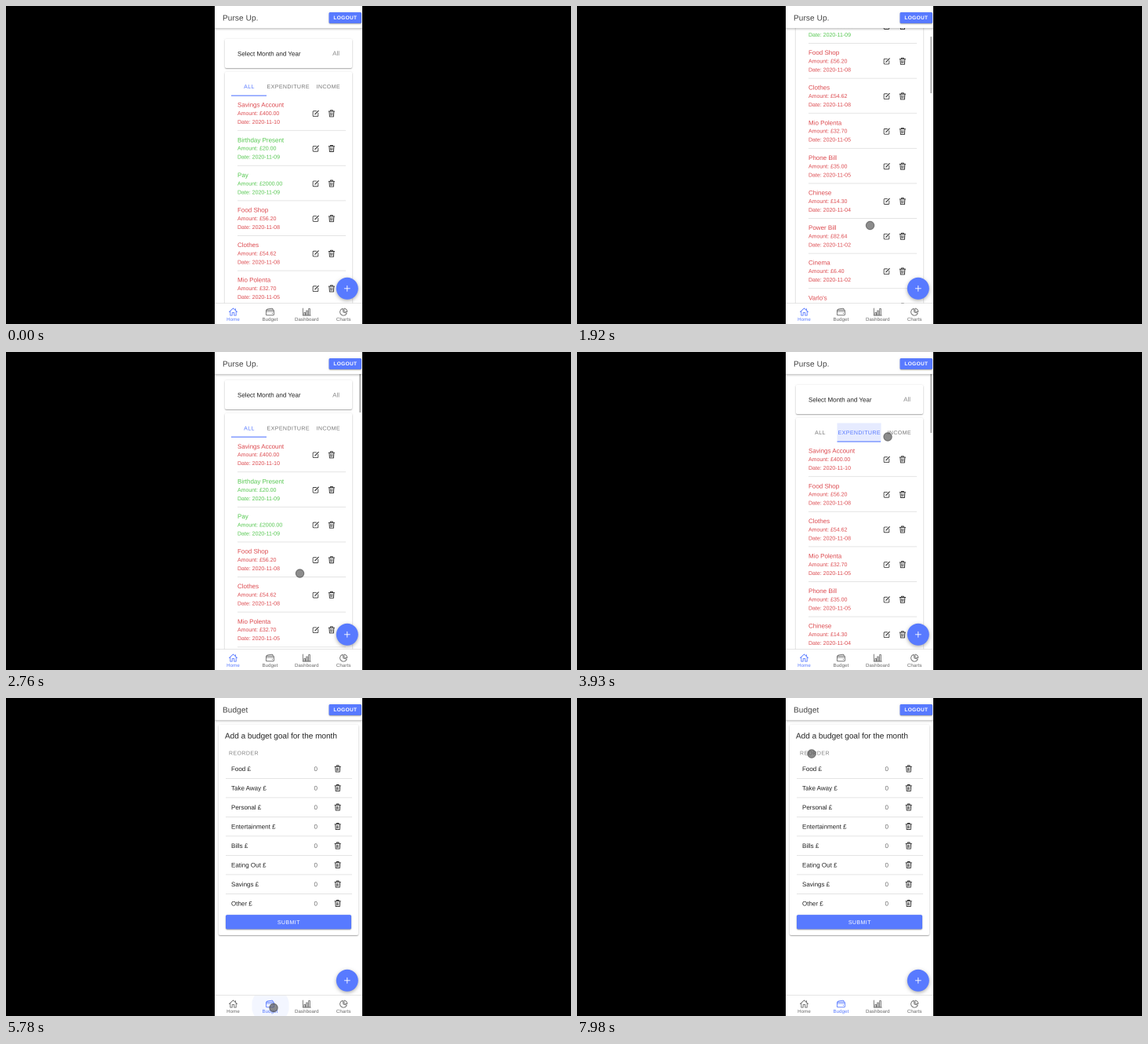
Write an HTML page with a canvas that moves like this. It is 720 px wide and 405 px high and loops after 8 s.

```html
<!DOCTYPE html>
<html lang="en">
<head>
<meta charset="utf-8">
<title>Budget app walkthrough</title>
<style>
html, body { margin: 0; width: 100%; height: 100%; overflow: hidden; background: #000; }
canvas { display: block; width: 720px; height: 405px; }
</style>
</head>
<body>
<canvas id="stage"></canvas>
<script>
const LOOP = 8000, W = 720, H = 405, LEFT = 266, RIGHT = 454;
const BLUE = '#587aff', RED = '#dd4b50', GREEN = '#55c850', DARK = '#2b2b2b', GREY = '#777', RULE = '#dedede';
const canvas = document.getElementById('stage');
const ctx = canvas.getContext('2d');
// Drawn at double size and scaled down, so small text keeps its true proportions.
const ratio = 2 * (window.devicePixelRatio || 1);
canvas.width = W * ratio;
canvas.height = H * ratio;

const TO_EXPENSES = 3450, TO_INCOME = 4200, TO_BUDGET = 5400, ROW = 44.6;

// name, amount, date, is income
const entries = [
  ['Savings Account', '400.00', '2020-11-10'],
  ['Birthday Present', '20.00', '2020-11-09', true],
  ['Pay', '2000.00', '2020-11-09', true],
  ['Food Shop', '56.20', '2020-11-08'],
  ['Clothes', '54.62', '2020-11-08'],
  ['Mio Polenta', '32.70', '2020-11-05'],
  ['Phone Bill', '35.00', '2020-11-05'],
  ['Chinese', '14.30', '2020-11-04'],
  ['Power Bill', '82.64', '2020-11-02'],
  ['Cinema', '6.40', '2020-11-02'],
  ["Varlo's", '18.50', '2020-11-01'],
  ['Pay', '2000.00', '2020-10-09', true],
  ['Refund', '24.00', '2020-10-02', true],
  ['Pay', '2000.00', '2020-09-09', true],
  ['Pay', '2000.00', '2020-08-09', true]
];
const goals = ['Food', 'Take Away', 'Personal', 'Entertainment', 'Bills', 'Eating Out', 'Savings', 'Other'];
const views = [
  { label: 'ALL', x: 287, w: 45, thumb: 72, rows: entries },
  { label: 'EXPENDITURE', x: 331.5, w: 55.5, thumb: 99, rows: entries.filter(e => !e[3]) },
  { label: 'INCOME', x: 387.5, w: 45.5, thumb: 208, rows: entries.filter(e => e[3]) }
];

const scrollKeys = [[550, 0], [1060, 113.7], [1460, 183], [1770, 183], [1920, 200.3],
  [2300, 228], [2470, 228], [2760, 6], [2860, 0]];
const pointerKeys = [[230, 460, 268], [560, 373, 279], [1500, 373, 279], [1920, 373.5, 279.5],
  [2760, 374.5, 282], [2900, 374, 280], [3400, 362, 105], [3640, 363, 105], [3930, 396, 108],
  [4120, 409, 104], [4300, 409, 104], [4930, 339, 398], [5080, 339, 396], [5250, 340, 394.5],
  [5780, 341, 394.5], [6560, 341, 394.5], [6950, 368, 394], [7180, 368, 394],
  [7440, 421, 250], [7640, 412, 95], [7840, 318, 63], [7980, 299, 71]];

const clamp = v => Math.max(0, Math.min(1, v));
const smooth = v => v * v * (3 - 2 * v);
const linear = v => v;

function track(keys, t, ease) {
  if (t <= keys[0][0]) return keys[0].slice(1);
  for (let i = 1; i < keys.length; i++) {
    const a = keys[i - 1], b = keys[i];
    if (t <= b[0]) {
      const k = ease((t - a[0]) / (b[0] - a[0]));
      return a.slice(1).map((v, j) => v + (b[j + 1] - v) * k);
    }
  }
  return keys[keys.length - 1].slice(1);
}

function rect(x, y, w, h, color) {
  ctx.fillStyle = color;
  ctx.fillRect(x, y, w, h);
}

function box(x, y, w, h, r, color) {
  ctx.beginPath();
  ctx.roundRect(x, y, w, h, r);
  ctx.fillStyle = color;
  ctx.fill();
}

function shadow(color, blur, dy) {
  ctx.shadowColor = color;
  ctx.shadowBlur = blur * ratio;
  ctx.shadowOffsetY = dy * ratio;
}

function raised(draw) {
  ctx.save();
  shadow('rgba(0,0,0,.16)', 2.5, .5);
  draw();
  shadow('rgba(0,0,0,.25)', 1, 1);
  draw();
  ctx.restore();
}

function text(str, x, y, size, color, { align = 'left', gap = 0, weight = 400 } = {}) {
  ctx.font = `${weight} ${size}px "Liberation Sans", Arial, sans-serif`;
  ctx.textRendering = 'geometricPrecision';
  ctx.letterSpacing = gap + 'px';
  ctx.textAlign = align;
  ctx.fillStyle = color;
  ctx.fillText(str, x, y);
}

function stroke(d, x, y, color, width = .9) {
  ctx.save();
  ctx.translate(x, y);
  ctx.strokeStyle = color;
  ctx.lineWidth = width;
  ctx.lineJoin = ctx.lineCap = 'round';
  ctx.stroke(new Path2D(d));
  ctx.restore();
}

function trash(x, y) {
  stroke('M-3.7-2.7H3.7M-1.4-2.7V-4H1.4V-2.7M-3-2.7L-2.5 4.1H2.5L3-2.7', x, y, DARK, .9);
  stroke('M-1.2-1L-1 2.5M0-1V2.5M1.2-1L1 2.5', x, y, DARK, .6);
}

function edit(x, y) {
  stroke('M.8-3.1H-2.4Q-3.6-3.1-3.6-2V2.6Q-3.6 3.7-2.4 3.7H2Q3.1 3.7 3.1 2.6V-.6', x, y, DARK, .8);
  stroke('M-.9 1L3.5-3.5', x, y, DARK, 1.1);
}

function header(title) {
  const fade = ctx.createLinearGradient(0, 28, 0, 31.5);
  fade.addColorStop(0, 'rgba(0,0,0,.21)');
  fade.addColorStop(1, 'rgba(0,0,0,0)');
  rect(LEFT, 28, RIGHT - LEFT, 3.5, fade);
  rect(LEFT, 0, RIGHT - LEFT, 28, '#fff');
  text(title, 276, 18.3, 10, '#424242', { gap: .125 });
  raised(() => box(411.5, 8, 41.5, 14, 2, BLUE));
  text('LOGOUT', 432.4, 17.2, 6.5, '#fff', { align: 'center', gap: .36, weight: 700 });
}

const navItems = [
  ['Home', 'M-5 0L0-4.7L5 0M-3.7-1V4.5H-1.3V1H1.3V4.5H3.7V-1M3-4V-2'],
  ['Budget', 'M-3.8-2.4H3.8Q5-2.4 5-1.2V3Q5 4.2 3.8 4.2H-3.8Q-5 4.2-5 3V-1.2Q-5-2.4-3.8-2.4M-4.6-2.2Q-4.4-3.3-3.2-3.6L2.4-4.4Q3.8-4.5 3.8-2.4M-5-.6H5M2.8 1.8H3.2'],
  ['Dashboard', 'M-5-4.5V4.5H5M-3.4 1H-1.8V4.3H-3.4ZM-.6-1.6H1V4.3H-.6ZM2.4-4H4V4.3H2.4Z'],
  ['Charts', 'M-1-4.2A4.4 4.4 0 1 0 4 1.6L-.3.4ZM.8-4.6A4.5 4.5 0 0 1 4.6 0L.8-.6Z']
];

function nav(active, t) {
  rect(LEFT, 379, RIGHT - LEFT, 26, '#fff');
  rect(LEFT, 378.3, RIGHT - LEFT, .7, '#dcdcdc');
  const age = t - TO_BUDGET;
  if (age > 0 && age < 560) {
    ctx.save();
    ctx.beginPath();
    ctx.rect(313.5, 379, 47, 26);
    ctx.clip();
    ctx.globalAlpha = .07 * clamp((560 - age) / 160);
    ctx.beginPath();
    ctx.arc(337, 392, 8 + 16 * clamp(age / 220), 0, 7);
    ctx.fillStyle = BLUE;
    ctx.fill();
    ctx.restore();
  }
  navItems.forEach(([label, icon], i) => {
    const x = 289.5 + i * 46.9, color = i === active ? BLUE : '#666';
    stroke(icon, x, 389.6, color, .85);
    text(label, x, 401.2, 6.1, color, { align: 'center', gap: .1 });
  });
}

function fab() {
  ctx.save();
  shadow('rgba(0,0,0,.33)', 5, 1.5);
  ctx.beginPath();
  ctx.arc(434.8, 359.8, 14, 0, 7);
  ctx.fillStyle = BLUE;
  ctx.fill();
  ctx.restore();
  stroke('M-3.5 0H3.5M0-3.5V3.5', 434.8, 359.8, '#fff', .9);
}

function card(x, y, w, h) {
  raised(() => box(x, y, w, h, 2, '#fff'));
}

function segment(active, since, from) {
  const view = views[active];
  if (active) {
    ctx.globalAlpha = .15 * clamp(since / 150);
    rect(view.x, 90.5, view.w + .5, 24, BLUE);
    ctx.globalAlpha = 1;
  }
  views.forEach((v, i) => text(v.label, v.x + v.w / 2 + .5, 105.2, 7,
    i === active ? BLUE : GREY, { align: 'center', gap: .42 }));
  const k = smooth(clamp(since / 260)), old = views[from];
  rect(old.x + (view.x - old.x) * k, 113.6, old.w + (view.w - old.w) * k, 1.1, BLUE);
}

function homePage(t) {
  const active = t < TO_EXPENSES ? 0 : t < TO_INCOME ? 1 : 2;
  const since = active ? t - (active === 1 ? TO_EXPENSES : TO_INCOME) : 1000;
  const [scroll] = track(scrollKeys, t, linear);
  const view = views[active];

  ctx.save();
  ctx.translate(0, -scroll);
  card(279, 42, 162, 37);
  text('Select Month and Year', 295, 63.4, 8, '#222');
  text('All', 425, 63.2, 8, '#8c8c8c', { align: 'right' });
  card(279, 84, 162, 1200);
  segment(active, since, Math.max(0, active - 1));
  view.rows.forEach(([name, amount, date, income], i) => {
    const y = i * ROW, color = income ? GREEN : RED;
    if (y - scroll > 290) return;
    text(name, 295, 128.7 + y, 8, color);
    text('Amount: £' + amount, 295, 139.1 + y, 7, color);
    text('Date: ' + date, 295, 150.1 + y, 7, color);
    edit(394.7, 136.9 + y);
    trash(414.9, 136.8 + y);
    rect(295, 158.3 + y, 138, .8, RULE);
  });
  ctx.restore();

  ctx.globalAlpha = clamp((t - 550) / 100);
  rect(450.5, 4 + scroll * .175, 1.4, view.thumb, '#9a9a9a');
  ctx.globalAlpha = 1;
  header('Purse Up.');
  fab();
  nav(0, t);
}

function budgetPage(t) {
  card(271, 34, 178, 268);
  text('Add a budget goal for the month', 279, 51.5, 10, '#222');
  text('REORDER', 284, 72.6, 7, '#858585', { gap: .42 });
  goals.forEach((goal, i) => {
    const y = i * 24.5;
    text(goal + ' £', 287, 93 + y, 8, '#222');
    text('0', 394.7, 92.8 + y, 8, '#6c6c6c', { align: 'center' });
    trash(422.7, 90 + y);
    if (i < goals.length - 1) rect(280, 102 + y, 161, .8, RULE);
  });
  raised(() => box(280, 276.3, 160, 18, 2, BLUE));
  text('SUBMIT', 360.3, 287.9, 7, '#fff', { align: 'center', gap: .42 });
  header('Budget');
  fab();
  nav(1, t);
}

function pointer(t) {
  if (t < 230) return;
  const [x, y] = track(pointerKeys, t, smooth);
  ctx.beginPath();
  ctx.arc(x, y, 5.2, 0, 7);
  ctx.fillStyle = 'rgba(80,80,80,.66)';
  ctx.fill();
  ctx.strokeStyle = 'rgba(60,60,60,.6)';
  ctx.lineWidth = 1;
  ctx.stroke();
}

function draw(t) {
  ctx.setTransform(ratio, 0, 0, ratio, 0, 0);
  rect(0, 0, W, H, '#000');
  ctx.save();
  ctx.beginPath();
  ctx.rect(LEFT, 0, RIGHT - LEFT, H);
  ctx.clip();
  rect(LEFT, 0, RIGHT - LEFT, H, '#fff');
  (t < TO_BUDGET ? homePage : budgetPage)(t);
  pointer(t);
  ctx.restore();
}

const start = performance.now();
function frame() {
  draw((performance.now() - start) % LOOP);
  requestAnimationFrame(frame);
}
frame();
</script>
</body>
</html>
```
